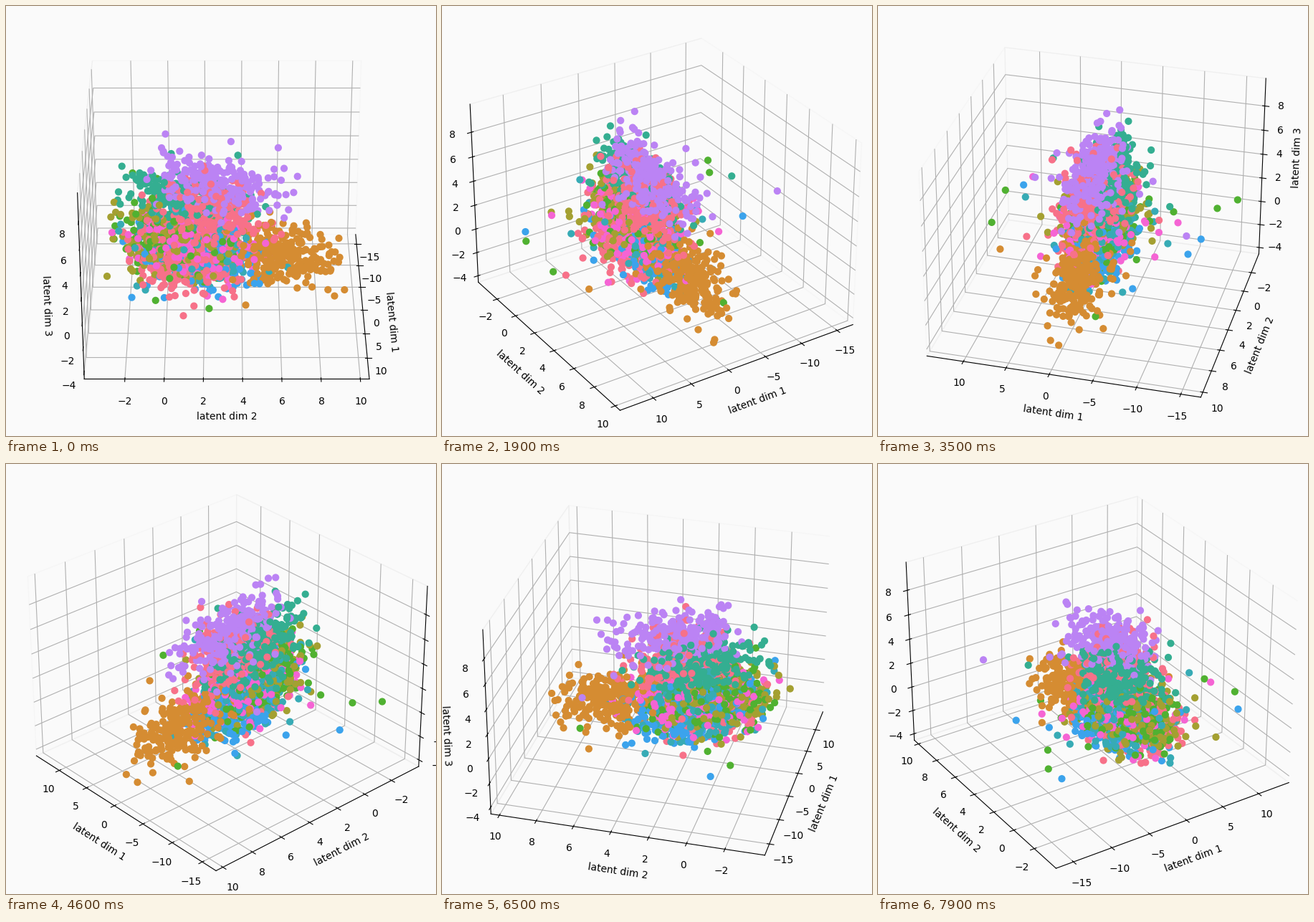
Recreate the animation shown at these times as a matplotlib script. Size 600 by 600 pixels, loop 8000 ms.

```python
import numpy as np
import matplotlib.pyplot as plt
from matplotlib.animation import FuncAnimation

FRAMES, INTERVAL, STEP = 80, 100, 3
BG = "#fafafa"
GREEN, PINK = "#50b131", "#f77189"
LIMITS = np.array([(-17.25, 14.3), (-4.07, 10.46), (-4.56, 10.25)])

# every class is a cloud of the same form around its own centre
CENTRES = [
    (PINK, (0, 2.2, 3.8)), (PINK, (0.8, 0.9, 0)),
    ("#d58c32", (-0.8, 6.0, -0.1)),
    ("#a4a031", (-0.4, 0.3, 1.0)),
    (GREEN, (-0.8, 0.9, 0.8)),
    ("#34ae91", (-1.6, 1.2, 3.9)),
    ("#37abb5", (-1.0, 1.6, 0.4)),
    ("#3ba3ec", (-1.0, 1.9, -0.2)),
    ("#bb83f4", (-0.6, 2.7, 5.6)),
    ("#f564d4", (-0.4, 1.6, 0.7)),
]
COUNT, SPREAD, SLOPE = 260, (1.3, 1.5, 1.1), -0.25
LONERS = [(-15.3, -2.0, 1.5), (12.1, -0.4, 1.0), (12.0, 2.3, 0.3),
          (-3.6, 7.5, -1.9)]


def make_cloud(rng, centre):
    """Heavy tails along dim 1, and dim 3 sinking as dim 2 grows."""
    unit = np.column_stack([rng.standard_t(4, COUNT),
                            rng.normal(size=(COUNT, 2))])
    cloud = unit * SPREAD
    cloud[:, 2] += SLOPE * cloud[:, 1]
    cloud += centre
    low, high = LIMITS.T + np.array([[2], [-2]]) * (1, 0.5, 0.5)
    return cloud[((cloud > low) & (cloud < high)).all(axis=1)]


def make_points(seed=7):
    rng = np.random.default_rng(seed)
    points, colors = [np.array(LONERS)], [GREEN] * len(LONERS)
    for color, centre in CENTRES:
        cloud = make_cloud(rng, centre)
        points.append(cloud)
        colors += [color] * len(cloud)
    return np.vstack(points), colors


fig = plt.figure(figsize=(6, 6), dpi=100, facecolor=BG)
ax = fig.add_axes([0, 0, 1, 1], projection="3d", facecolor=BG)

points, colors = make_points()
ax.scatter(*points.T, c=colors, s=40, depthshade=False)

xlim, ylim, zlim = LIMITS
ax.set(xlim=xlim, ylim=ylim, zlim=zlim,
       xticks=range(-15, 11, 5), yticks=range(-2, 11, 2),
       zticks=range(-4, 9, 2),
       xlabel="latent dim 1", ylabel="latent dim 2", zlabel="latent dim 3")
for axis in (ax.xaxis, ax.yaxis, ax.zaxis):
    axis.pane.fill = False


def update(i):
    # the tiny offset keeps the wall choice stable at right angles
    ax.view_init(elev=30, azim=STEP * i + 1e-3)
    return []


anim = FuncAnimation(fig, update, frames=FRAMES, interval=INTERVAL,
                     init_func=lambda: update(0), repeat=True, repeat_delay=0)
plt.show()
```
